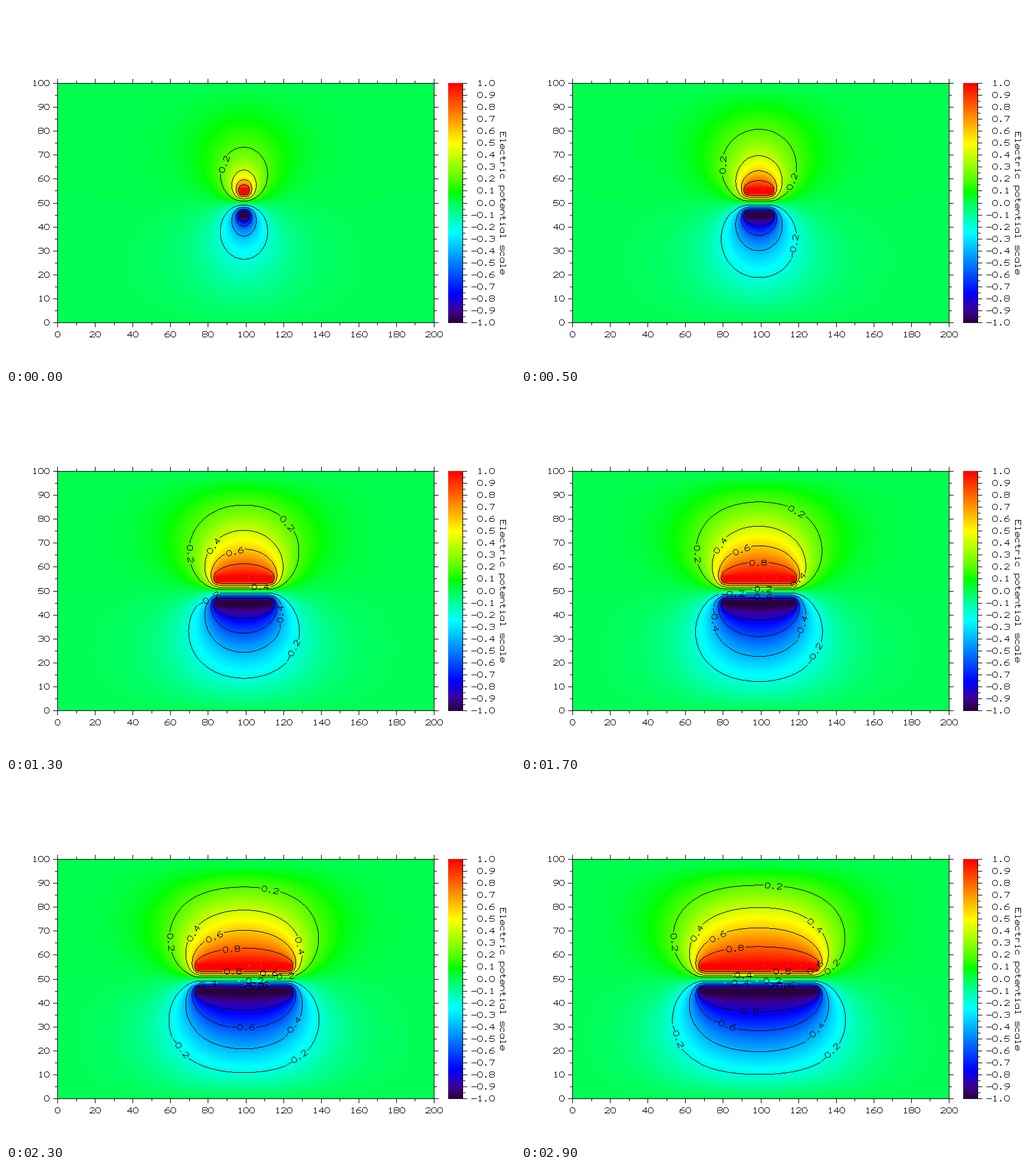
A matplotlib script that plays this animation: 853 by 603 pixels, repeating every 3 s.

```python
import math

import numpy as np
import matplotlib.pyplot as plt
from matplotlib.animation import FuncAnimation
from matplotlib.colors import ListedColormap

W, H, DPI = 853, 603, 64
FRAMES, INTERVAL = 30, 100
NX, NY, CENTER = 200, 100, 99
SX, SY = 3.155, 4.01
LEFT, RIGHT, TOP, BOTTOM = 86.5, 717.5, 129.5, 530.5
PITCH = 10


def px(x):
    return LEFT + SX * x


def py(y):
    return BOTTOM - SY * y


def pixel_center(v):
    return math.floor(v) + 0.5


# Stroke lettering built from straight strokes and rounded bowls, 8 by 9 pixels.
def poly(*coords):
    return np.array(coords, float).reshape(-1, 2)


def bowl(low, high, start=0, stop=360):
    a = np.radians(np.linspace(start, stop, 25))
    c, s = np.cos(a), np.sin(a)
    squarish = [np.sign(k) * np.abs(k) ** 0.75 for k in (c, s)]
    return np.column_stack([4 + 4 * squarish[0],
                            (low + high) / 2 + (high - low) / 2 * squarish[1]])


foot = poly(2, 0, 6, 0)
GLYPHS = {
    " ": [],
    ".": [poly(3, 0, 4, 0, 4, 1, 3, 1)],
    "-": [poly(0, 4, 8, 4)],
    "0": [bowl(0, 9)],
    "1": [poly(2, 7, 4, 9, 4, 0), foot],
    "2": [bowl(4, 9, 165, 0), poly(8, 6, 0, 0, 8, 0)],
    "3": [bowl(5, 9, 150, -90), bowl(0, 5, 90, -150)],
    "4": [poly(6, 0, 6, 9, 0, 3, 8, 3)],
    "5": [poly(8, 9, 1, 9, 0, 4), bowl(0, 5, 150, -150)],
    "6": [bowl(0, 5), poly(0, 3, 0, 5, 4, 9, 7, 9)],
    "7": [poly(0, 9, 8, 9, 3, 0)],
    "8": [bowl(0, 5), bowl(5, 9)],
    "E": [poly(8, 9, 0, 9, 0, 0, 8, 0), poly(0, 5, 5, 5)],
    "l": [poly(2, 9, 4, 9, 4, 0), foot],
    "i": [poly(2, 6, 4, 6, 4, 0), foot, poly(4, 8, 4, 9)],
    "t": [poly(3, 9, 3, 1, 4, 0, 7, 0), poly(0, 6, 6, 6)],
    "r": [poly(1, 6, 1, 0), bowl(0, 6, 165, 45)],
    "n": [poly(0, 6, 0, 0), bowl(0, 6, 180, 0), poly(8, 3, 8, 0)],
    "e": [bowl(0, 6, 0, 315), poly(0, 3, 8, 3)],
    "c": [bowl(0, 6, 45, 315)],
    "o": [bowl(0, 6)],
    "p": [bowl(0, 6), poly(0, 6, 0, -3)],
    "a": [bowl(0, 6), poly(8, 6, 8, 0)],
    "s": [bowl(3, 6, 30, 270), bowl(0, 3, 90, -150)],
}
GLYPHS["9"] = [(8, 9) - line for line in GLYPHS["6"]]


def text_width(text):
    return PITCH * len(text) - 2


def strokes(text, mid, along=(1, 0)):
    """Polylines of a text centred on mid and running in direction along."""
    u = np.array(along, float)
    v = np.array([u[1], -u[0]])
    half = text_width(text) / 2
    return [mid + np.outer(p[:, 0] + PITCH * i - half, u) + np.outer(p[:, 1] - 4.5, v)
            for i, ch in enumerate(text) for p in GLYPHS[ch]]


def stamp(lines):
    """Hard-edged mask of polylines, one pixel wide."""
    mask = np.zeros((H, W), bool)
    for line in lines:
        p = np.asarray(line, float)
        run = np.concatenate([[0], np.cumsum(np.abs(np.diff(p, axis=0)).max(axis=1))])
        t = np.linspace(0, run[-1], math.ceil(run[-1] - 1e-6) + 1)
        cols = np.floor(np.interp(t, run, p[:, 0]) + 1e-6).astype(int)
        rows = np.floor(np.interp(t, run, p[:, 1]) + 1e-6).astype(int)
        mask[rows, cols] = True
    return mask


def solve(phi, n, sweeps):
    """Relax the potential around two plates inside a grounded box."""
    free = np.zeros((NY, NX))
    free[1:-1, 1:-1] = 1
    cols = slice(CENTER - 2 - n, CENTER + 3 + n)
    for rows, value in ((slice(54, 57), 1), (slice(44, 47), -1)):
        phi[rows, cols] = value
        free[rows, cols] = 0
    parity = np.add.outer(np.arange(NY), np.arange(NX)) % 2
    masks = [1.94 * (free * (parity == k))[1:-1, 1:-1] for k in (0, 1)]
    inner = phi[1:-1, 1:-1]
    for _ in range(sweeps):
        for mask in masks:
            mean = (phi[:-2, 1:-1] + phi[2:, 1:-1] + phi[1:-1, :-2] + phi[1:-1, 2:]) / 4
            inner += mask * (mean - inner)


def walk_from_start(seg, level):
    """Order a closed contour from its label origin, heading upwards."""
    pts = seg[:-1]
    x, y = pts.T
    clockwise = np.sum(x * np.roll(y, -1) - np.roll(x, -1) * y) > 0
    if clockwise != (level > 0):
        pts = pts[::-1]
        x, y = pts.T
    side = -1 if level > 0 else 1
    reach = side * x
    if level > -0.5:
        lowest_row = py(math.ceil((BOTTOM - y.max()) / SY))
        reach = np.where(np.abs(y - lowest_row) < 0.3, reach, -W)
    pts = np.roll(pts, -np.argmax(reach), axis=0)
    return np.vstack([pts, pts[:1]])


def labelled_contour(seg, level):
    """Contour pieces with gaps, plus the label strokes in the gaps."""
    pts = walk_from_start(seg, level)
    dist = np.concatenate([[0], np.cumsum(np.hypot(*np.diff(pts, axis=0).T))])
    total = dist[-1]

    def at(s):
        return np.array([np.interp(s, dist, pts[:, 0]), np.interp(s, dist, pts[:, 1])])

    def span(a, b):
        inside = (dist > a) & (dist < b)
        return np.vstack([at(a), pts[inside], at(b)])

    text = f"{level:.1f}"
    gap = text_width(text) + 8
    shortest, room = (246, 45) if level > 0 else (300, 100)
    lines, done = [], 0
    if total > shortest:
        for s in np.arange(78, total - room, 185 + gap):
            p, q = at(s - gap / 2), at(s + gap / 2)
            lines.append(span(done, s - gap / 2))
            done = s + gap / 2
            if q[0] < p[0]:
                p, q = q, p
            lines += strokes(text, (p + q) / 2, (q - p) / np.hypot(*(q - p)))
    lines.append(span(done, total))
    return lines


def axis_lines():
    """Frame, ticks, numbers and title."""
    lines = [poly(LEFT, TOP, RIGHT, TOP, RIGHT, BOTTOM, LEFT, BOTTOM, LEFT, TOP)]

    def right_aligned(text, edge, y):
        return strokes(text, (edge - text_width(text) / 2, math.floor(y)))

    for x in range(0, 201, 10):
        size = 4 if x % 20 else 7
        c = pixel_center(px(x))
        lines += [poly(c, BOTTOM, c, BOTTOM + size), poly(c, TOP, c, TOP - size)]
        if x % 20 == 0:
            lines += strokes(str(x), (c, 550))
    for y in range(0, 101, 5):
        size = 4 if y % 10 else 7
        c = pixel_center(py(y))
        lines += [poly(LEFT, c, LEFT - size, c), poly(RIGHT, c, RIGHT + size, c)]
        if y % 10 == 0:
            lines += right_aligned(str(y), 72.5, c)
    bar = 765.5
    lines.append(poly(bar, TOP, bar, BOTTOM))
    for k in range(41):
        size = 4 if k % 2 else 7
        c = pixel_center(py(k * 2.5))
        lines.append(poly(bar, c, bar + size, c))
        if k % 2 == 0:
            lines += right_aligned(f"{(k - 20) / 20:.1f}", 818.5, c)
    return lines + strokes("Electric potential scale", (833, 330.5), (0, 1))


def rainbow():
    """Dark violet, blue, cyan, green, yellow and red from -1 to 1."""
    v = np.linspace(-1, 1, 254)

    def ramp(start, stop):
        return np.clip((v - start) / (stop - start), 0, 1)

    blue, cyan, green, yellow = -0.76, -0.25, 0.09, 0.5
    violet = np.interp(v, [-1, -0.9, blue], [0.16, 0.24, 0])
    dim = np.interp(v, [-1, -0.9, blue], [0.24, 0.59, 1])
    r = ramp(green, yellow) ** 0.85 + violet
    g = np.minimum(ramp(blue, cyan), ramp(1, yellow))
    b = ramp(green, cyan) ** 0.85 * dim
    return ListedColormap(np.column_stack([r, g, b]))


def hat_weights(coords, count):
    """Linear interpolation weights from grid nodes to pixels."""
    coords = np.clip(coords, 0, count - 1)
    return np.maximum(0, 1 - np.abs(coords[:, None] - np.arange(count)))


fig = plt.figure(figsize=(W / DPI, H / DPI), dpi=DPI, facecolor="white")
ax = fig.add_axes([0, 0, 1, 1])
ax.axis("off")

sharp = dict(aspect="auto", interpolation="nearest")
shade = dict(cmap=rainbow(), vmin=-1, vmax=1, **sharp)
field = ax.imshow(np.zeros((401, 631)), extent=(87, 718, 531, 130), zorder=1, **shade)
ax.imshow(np.linspace(1, -1, 402)[:, None], extent=(741, 766, 531, 129), zorder=1, **shade)
ink = ax.imshow(np.zeros((H, W, 4), np.uint8), extent=(0, W, H, 0), zorder=3, **sharp)
specks, = ax.plot([], [], ",", color="white", zorder=2)
speck_x = 406.5 + 21 * np.arange(5)
ax.set_xlim(0, W)
ax.set_ylim(H, 0)

to_cols = hat_weights((np.arange(87, 718) + 0.5 - LEFT) / SX, NX).T
to_rows = hat_weights((BOTTOM - np.arange(130, 531) - 0.5) / SY, NY)


def build_scenes():
    levels = [k / 5 for k in range(-4, 5) if k]
    axes_mask = stamp(axis_lines())
    phi = np.zeros((NY, NX))
    scenes = []
    for n in range(FRAMES):
        solve(phi, n, 250 if n else 500)
        cs = ax.contour(px(np.arange(NX)), py(np.arange(NY)), phi, levels)
        lines = []
        for level, segs in zip(levels, cs.allsegs):
            for seg in segs:
                if len(seg) > 8:
                    lines += labelled_contour(seg, level)
        cs.remove()
        scenes.append((phi.copy(), axes_mask | stamp(lines)))
    return scenes


scenes = build_scenes()
ax.set_xlim(0, W)
ax.set_ylim(H, 0)


def update(n):
    phi, mask = scenes[n]
    field.set_data(to_rows @ phi @ to_cols)
    black = np.zeros((H, W, 4), np.uint8)
    black[..., 3] = 255 * mask
    ink.set_data(black)
    shown = speck_x[speck_x < px(CENTER + 2 + n)]
    specks.set_data(shown, np.full(len(shown), 307.5))
    return field, ink, specks


anim = FuncAnimation(fig, update, frames=FRAMES, interval=INTERVAL,
                     init_func=lambda: update(0), repeat=True, repeat_delay=0)
plt.show()
```
